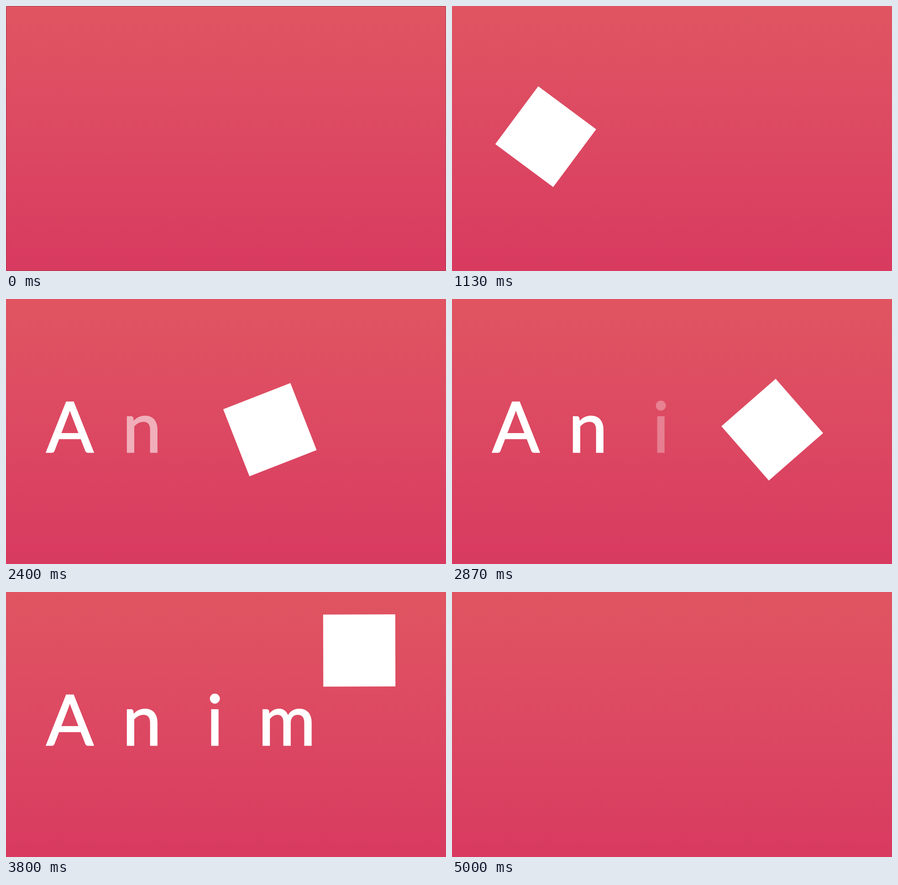
An HTML page without scripts that plays this animation: 964 px wide and 581 px high, repeating every 5470 ms.

```html
<!DOCTYPE html>
<html lang="en">
<head>
<meta charset="utf-8">
<title>Rolling square</title>
<style>
  html, body { margin: 0; width: 100%; height: 100%; overflow: hidden; }
  body { background: linear-gradient(#e05561, #dd4b62 40%, #d83a60); }
  svg { display: block; width: 964px; height: 581px; }

  .edge { fill: none; stroke: #a83848; animation: edge 5470ms step-end infinite; }

  .square {
    fill: #fff;
    transform-origin: 0 0;
    animation: roll 5470ms cubic-bezier(.25, .1, .15, 1) infinite,
               show 5470ms cubic-bezier(.25, .1, .15, 1) infinite;
  }

  .word {
    font: 400 153px Lato, sans-serif;
    text-anchor: middle;
    fill: #fff;
    stroke: #fff;
    stroke-width: 2.5px;
    animation: leave 5470ms cubic-bezier(.28, 0, .4, 1) infinite;
  }
  .word text { animation: 5470ms cubic-bezier(.28, 0, .4, 1) infinite; }
  .word text:nth-child(1) { animation-name: enter1; }
  .word text:nth-child(2) { animation-name: enter2; }
  .word text:nth-child(3) { animation-name: enter3; }
  .word text:nth-child(4) { animation-name: enter4; }
  .word text:nth-child(5) { animation-name: enter5; }

  @keyframes edge { 0% { opacity: 1 } 2.37%, 100% { opacity: 0 } }

  /* up, four rolls to the right, up again: a quarter turn each */
  @keyframes roll {
    0%, 8.72%      { transform: translate(141px, 445px) rotate(0deg) }
    17.86%, 18.67% { transform: translate(141px, 286.5px) rotate(90deg) }
    27.81%, 29.52% { transform: translate(299.25px, 286.5px) rotate(180deg) }
    38.67%, 40.07% { transform: translate(457.5px, 286.5px) rotate(270deg) }
    49.21%, 49.95% { transform: translate(615.75px, 286.5px) rotate(360deg) }
    59.09%, 60.91% { transform: translate(774px, 286.5px) rotate(450deg) }
    70.05%, 100%   { transform: translate(774px, 128px) rotate(540deg) }
  }
  @keyframes show {
    0%, 2.01%     { opacity: 0 }
    6.22%, 71.88% { opacity: 1 }
    79.74%, 100%  { opacity: 0 }
  }

  @keyframes enter1 { 0%, 29.52% { opacity: 0 } 38.67%, 100% { opacity: 1 } }
  @keyframes enter2 { 0%, 40.07% { opacity: 0 } 49.21%, 100% { opacity: 1 } }
  @keyframes enter3 { 0%, 49.95% { opacity: 0 } 59.09%, 100% { opacity: 1 } }
  @keyframes enter4 { 0%, 60.91% { opacity: 0 } 70.05%, 100% { opacity: 1 } }
  @keyframes enter5 { 0%, 71.88% { opacity: 0 } 81.02%, 100% { opacity: 1 } }
  @keyframes leave  { 0%, 82.85% { opacity: 1 } 91.04%, 100% { opacity: 0 } }
</style>
</head>
<body>
<svg viewBox="0 0 964 581">
  <rect class="edge" x=".5" y=".5" width="963" height="580" rx="1"/>
  <g class="word">
    <text x="140" y="335.8">A</text>
    <text x="298" y="335.8">n</text>
    <text x="457.5" y="335.8">i</text>
    <text x="615.5" y="335.8">m</text>
    <text x="773" y="335.8">a</text>
  </g>
  <rect class="square" x="-79" y="-79" width="158" height="158"/>
</svg>
</body>
</html>
```
